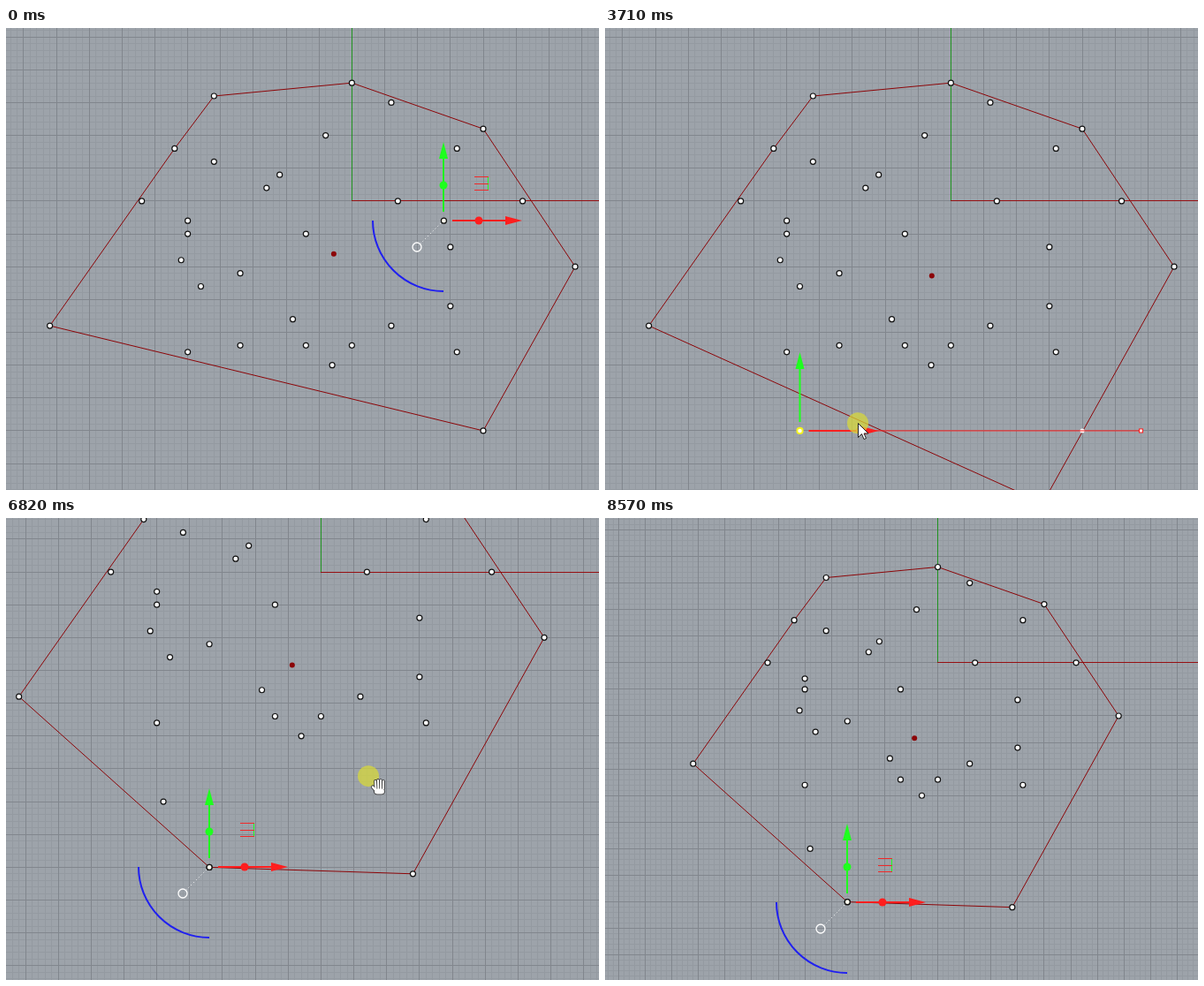
Write an HTML page with a canvas that moves like this. It is 671 by 523 pixels and loops after 9420 ms.

```html
<!DOCTYPE html>
<html lang="en">
<head>
<meta charset="utf-8">
<title>Convex hull editor</title>
<style>
html, body { margin: 0; width: 100%; height: 100%; overflow: hidden; background: #9da3aa; }
canvas { display: block; }
</style>
</head>
<body>
<canvas id="stage" width="671" height="523"></canvas>
<script>
const W = 671, H = 523, LOOP = 9420;
const UNIT = 7.43, ORIGIN = { x: 391.4, y: 195.9 };
const ZOOM_AT = 7390, ZOOM = 0.81;
const HOVER = 400, HOLD = 620;
const RED = '#ff1e1e', GREEN = '#1eff1e', HULL = '#8c0508', DARK = '#111';
const g = document.getElementById('stage').getContext('2d');

// Resting points in grid units, y downwards
const points = [
  [-46, 19], [-27, -8], [-21, -16], [0, -18], [20, -11], [34, 10],
  [-32, 0], [-26, 9], [-25, 3], [-25, 5], [-25, 23], [-23, 13], [-21, -6], [-17, 11],
  [-13, -2], [-11, -4], [-9, 18], [-7, 5], [-7, 22], [-4, -10], [-3, 25], [0, 22],
  [6, -15], [6, 19], [7, 0], [15, 7], [15, 16], [16, -8], [16, 23], [26, 0]
];

// Points dragged by a handle, which sits `reach` pixels along the axis
const drags = [
  { home: [14, 3], axis: 1, reach: -67, part: 'y', pick: 0, press: 990 },
  { home: [20, 35], axis: 0, reach: 66.5, part: 'x', pick: 2500, press: 3310 },
  { home: [-17, 22], axis: 1, reach: -40, part: 'dot', pick: 4880, press: 5450 }
];

// Mouse strokes: begin, end, then where they lead
const strokes = [
  [70, 590, 489, 163], [990, 1500, 449, 486], [1830, 2690, 540, 456], [2840, 3150, 606, 456],
  [3310, 3780, 279, 447], [4270, 5400, 265, 320], [5450, 6000, 265, 490], [6120, 6270, 445, 427],
  [6270, 6820, 410, 292], [6820, 7150, 414, 313], [7540, 7770, 420, 351],
  [7940, 8170, 406, 345], [8330, 8570, 365, 545]
];
const isPan = t => t >= 6270 && t < 7150 || t >= 7540 && t < 7770;
const isPress = t => isPan(t) || drags.some(d => t >= d.press && t < d.press + HOLD || Math.abs(t - d.pick) < 80 && d.pick);

function mouse(t) {
  let x = 575, y = 540;
  for (const [begin, end, toX, toY] of strokes) {
    const left = 1 - Math.min(1, Math.max(0, (t - begin) / (end - begin)));
    x = toX + (x - toX) * left * left;
    y = toY + (y - toY) * left * left;
  }
  return { x, y };
}

function view(t) {
  const v = { ...ORIGIN, u: UNIT };
  const pan = (begin, end) => {
    const a = mouse(begin), b = mouse(Math.max(begin, Math.min(t, end)));
    v.x += b.x - a.x;
    v.y += b.y - a.y;
  };
  pan(6270, 7150);
  if (t >= ZOOM_AT) {
    const m = mouse(ZOOM_AT);
    v.x = m.x + (v.x - m.x) * ZOOM;
    v.y = m.y + (v.y - m.y) * ZOOM;
    v.u *= ZOOM;
    pan(7540, 7770);
  }
  return v;
}

// Position of a dragged point, snapped to the grid
function dragged(d, t) {
  const key = d.axis ? 'y' : 'x';
  const steps = Math.round((mouse(Math.min(t, d.press + HOLD))[key] - mouse(d.press)[key]) / UNIT);
  return d.home.map((v, i) => i === d.axis ? v + steps : v);
}

function convexHull(list) {
  const sorted = [...list].sort((a, b) => a[0] - b[0] || a[1] - b[1]);
  const half = pts => {
    const out = [];
    for (const p of pts) {
      while (out.length > 1) {
        const [a, b] = out.slice(-2);
        if ((b[0] - a[0]) * (p[1] - a[1]) - (b[1] - a[1]) * (p[0] - a[0]) > 0) break;
        out.pop();
      }
      out.push(p);
    }
    return out.slice(0, -1);
  };
  return half(sorted).concat(half(sorted.reverse()));
}

function centroid(poly) {
  let area = 0, x = 0, y = 0;
  poly.forEach((p, i) => {
    const q = poly[(i + 1) % poly.length], c = p[0] * q[1] - q[0] * p[1];
    area += c;
    x += c * (p[0] + q[0]);
    y += c * (p[1] + q[1]);
  });
  return [x / area / 3, y / area / 3];
}

function shape(pts, fill, stroke) {
  g.beginPath();
  pts.forEach(p => g.lineTo(p[0], p[1]));
  g.closePath();
  g.lineWidth = 1;
  if (fill) { g.fillStyle = fill; g.fill(); }
  if (stroke) { g.strokeStyle = stroke; g.stroke(); }
}

function disc([x, y], r, fill, stroke, width = 1.2) {
  g.beginPath();
  g.arc(x, y, r, 0, 7);
  if (fill) { g.fillStyle = fill; g.fill(); }
  if (stroke) { g.strokeStyle = stroke; g.lineWidth = width; g.stroke(); }
}

function line(a, b, color, width = 1) {
  g.strokeStyle = color;
  g.lineWidth = width;
  g.beginPath();
  g.moveTo(...a);
  g.lineTo(...b);
  g.stroke();
}

function rect(x, y, w, h, color) {
  g.fillStyle = color;
  g.fillRect(x, y, w, h);
}

function drawGrid({ x, y, u }) {
  rect(0, 0, W, H, '#9da3aa');
  const column = i => Math.floor(x + i * u), row = i => Math.floor(y + i * u);
  const rule = (step, color) => {
    for (let i = -70; i <= 70; i += step) {
      rect(column(i), 0, 1, H, color);
      rect(0, row(i), W, 1, color);
    }
  };
  rule(1, '#949aa1');
  rule(5, '#81868d');
  rect(column(0), 0, 1, row(0), '#1f921f');
  rect(column(0), row(0), W, 1, '#960f12');
}

function arrow([x, y], axis, color) {
  g.save();
  g.translate(x, y);
  if (axis) g.rotate(-Math.PI / 2);
  rect(10, -1, 62, 2, color);
  shape([[70, -5], [89, 0], [70, 5]], color);
  g.restore();
}

function drawGizmo([x, y], hover) {
  const tint = (part, color) => hover === part ? DARK : color;
  g.strokeStyle = '#2020f0';
  g.lineWidth = 2;
  g.beginPath();
  g.arc(x, y, 80, Math.PI / 2, Math.PI);
  g.stroke();
  g.setLineDash([1, 3]);
  line([x - 3, y + 3], [x - 27, y + 27], '#fff');
  g.setLineDash([]);
  disc([x - 30, y + 30], 5, null, '#fff', 1.3);
  arrow([x, y], 0, tint('x', RED));
  arrow([x, y], 1, tint('y', GREEN));
  disc([x + 40, y], 4.5, RED);
  disc([x, y - 40], 4.5, tint('dot', GREEN));
  rect(x + 50, y - 50, 1, 16, GREEN);
  for (let i = 0; i < 3; i++) rect(x + 35, y - 50 + Math.round(i * 7.5), 16, 1, '#f02828');
}

function drawDrag(d, from, to) {
  const handle = p => p.map((v, i) => i === d.axis ? v + d.reach : v);
  const ends = [handle(from), handle(to)];
  disc(from, 2.5, '#fff');
  line(...ends, d.axis ? '#a3a9af' : RED);
  arrow(to, 0, RED);
  arrow(to, 1, GREEN);
  for (const [x, y] of ends) {
    if (!d.axis) rect(x - 2.5, y - 2.5, 5, 5, RED);
    rect(x - 1.5, y - 1.5, 3, 3, '#fff');
  }
  disc(to, 3.2, '#fffff0', '#f4f41c', 1.8);
}

function drawHand() {
  const layer = (color, grow) => {
    for (let i = 0; i < 4; i++) {
      line([7.5 + i * 3, 4 + Math.abs(i - 1.4)], [8 + i * 2.8, 14], color, 2 + grow);
    }
    line([4.5, 12], [9, 17], color, 2.5 + grow);
    line([9.5, 17], [14.5, 17], color, 6 + grow);
  };
  g.lineCap = 'round';
  layer('#333', 1.6);
  layer('#fff', 0);
}

function drawMouse(t) {
  const { x, y } = mouse(t);
  if (isPress(t)) disc([x, y], 12, 'rgba(216,218,56,.72)');
  g.save();
  g.translate(Math.round(x) + 0.5, Math.round(y) + 0.5);
  if (isPan(t)) drawHand();
  else shape([[0, 0], [0, 16], [4, 12], [6.5, 18], [9, 17], [6.5, 11.5], [11.5, 11.5]], '#fff', '#222');
  g.restore();
}

function draw(t) {
  const v = view(t);
  const place = p => [v.x + p[0] * v.u, v.y + p[1] * v.u];
  const settled = d => t < d.press + HOLD ? d.home : dragged(d, t);
  const active = drags.filter(d => t >= d.pick).pop();
  const dropped = t >= active.press + HOLD;
  const dragging = t >= active.press && !dropped;
  const selected = settled(active);

  drawGrid(v);
  const all = points.concat(drags.map(settled));
  const hull = convexHull(all);
  shape(hull.map(place), null, HULL);
  if (active.part !== 'dot' || dropped) disc(place(centroid(hull)), 3, HULL);
  all.filter(p => p !== selected).forEach(p => disc(place(p), 3, '#fff', DARK));

  const at = place(selected);
  if (dragging) {
    drawDrag(active, at, place(dragged(active, t)));
  } else {
    const hovering = t >= active.press - HOVER && t < active.press;
    drawGizmo(at.map(Math.round), hovering && active.part);
    disc(at, 3, '#fffdf0', DARK);
  }
  drawMouse(t);
}

const start = performance.now();
function frame() {
  draw((performance.now() - start) % LOOP);
  requestAnimationFrame(frame);
}
frame();
</script>
</body>
</html>
```
